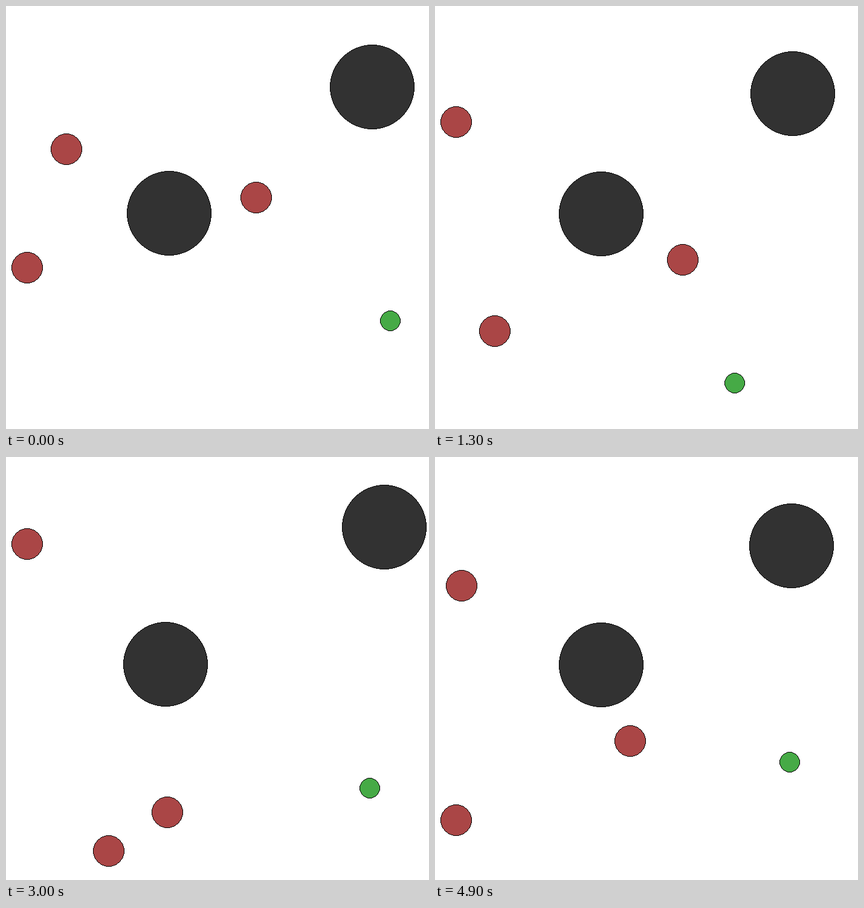
An HTML page with a canvas that plays this animation: 700 px wide and 700 px high, repeating every 5000 ms.

```html
<!DOCTYPE html>
<html lang="en">
<head>
<meta charset="utf-8">
<title>Pursuit</title>
<style>
  html, body { margin: 0; height: 100%; overflow: hidden; background: #fff; }
  canvas { display: block; width: 100vw; height: 100vh; }
</style>
</head>
<body>
<canvas id="stage" width="700" height="700"></canvas>
<script>
const STEP = 100, STEPS = 50, MID = 350, REACH = 315;
const chaser = path => ({ r: 26, fill: '#aa4646', path });
const runner = path => ({ r: 17, fill: '#46aa46', path });
const rock = (x, y) => ({ r: 70, fill: '#323232', path: [[0, x, y]] });

// Key points [step, x, y] in world space; a smooth curve joins them.
const bodies = [
  chaser([[0, -249.5, -112.5], [8, -273.6, -155.9], [10, -288, -161], [13, -333, -167],
          [18, -322.5, -170.5], [25, -262.3, -179.4], [30, -291.5, -190],
          [34, -360, -191.4], [42, -374.6, -161.1], [49, -325.5, -145.4]]),
  chaser([[0, -315, 83.5], [8, -304.05, 158.8], [18, -217.6, 227.8], [25, -171.9, 237.7],
          [28, -168, 273], [34, -172, 272.6], [42, -250.3, 263.4], [49, -335.6, 268]]),
  chaser([[0, 64.5, -32.5], [8, 70, 26.5], [18, 38.4, 124.4], [25, -49.5, 182.8],
          [34, -72.6, 236], [42, 5.4, 198], [49, -28.2, 128.4]]),
  runner([[0, 286.5, 171.5], [8, 177.1, 256.3], [12, 155, 293], [18, 173.5, 230.9],
          [25, 203.6, 194.4], [34, 248.6, 180], [42, 218.2, 173], [49, 253, 165.7]]),
  rock(256.2, -215.9),
  rock(-79.12, -6.1)
];

// Slope of one axis at key point i; every body starts at rest.
function slope(path, i, axis) {
  const rate = j => (path[j + 1][axis] - path[j][axis]) / (path[j + 1][0] - path[j][0]);
  if (i === 0) return 0;
  if (i === path.length - 1) return rate(i - 1);
  const before = path[i][0] - path[i - 1][0], after = path[i + 1][0] - path[i][0];
  return (after * rate(i - 1) + before * rate(i)) / (before + after);
}

// Cubic Hermite curve through the key points
function coordAt(path, n, axis) {
  const j = path.findIndex(p => p[0] > n);
  if (j < 0) return path[path.length - 1][axis];
  const a = path[j - 1], b = path[j], h = b[0] - a[0], u = (n - a[0]) / h, v = 1 - u;
  return v * v * ((1 + 2 * u) * a[axis] + u * h * slope(path, j - 1, axis))
       + u * u * ((1 + 2 * v) * b[axis] - v * h * slope(path, j, axis));
}

const ctx = document.getElementById('stage').getContext('2d');

// Midpoint circle: [half width, row] pairs of one quadrant
function spans(r) {
  const list = [];
  for (let x = 0, y = r, f = 1 - r; x < y;) {
    if (f >= 0) f -= 2 * --y;
    f += 2 * ++x + 1;
    list.push([x, y], [y, x]);
  }
  return list;
}

function disc(cx, cy, r, fill) {
  const rows = spans(r).flatMap(([w, d]) => [[w, cy - d], [w, cy + d - 1]]);
  ctx.fillStyle = fill;
  for (const [w, y] of rows) ctx.fillRect(cx - w, y, 2 * w, 1);
  ctx.fillStyle = '#000';
  for (const [w, y] of rows) {
    ctx.fillRect(cx - w, y, 1, 1);
    ctx.fillRect(cx + w - 1, y, 1, 1);
  }
}

// The camera zooms so that the farthest coordinate always lies at REACH.
function draw(n) {
  const places = bodies.map(b => [coordAt(b.path, n, 1), coordAt(b.path, n, 2)]);
  const range = Math.max(...places.flat().map(Math.abs));
  const project = p => Math.floor(p / range * REACH + MID);
  ctx.fillStyle = '#fff';
  ctx.fillRect(0, 0, 2 * MID, 2 * MID);
  bodies.forEach(({ r, fill }, i) => disc(...places[i].map(project), r, fill));
}

const start = performance.now();
function tick() {
  draw(Math.floor((performance.now() - start) / STEP) % STEPS);
  requestAnimationFrame(tick);
}
tick();
</script>
</body>
</html>
```
